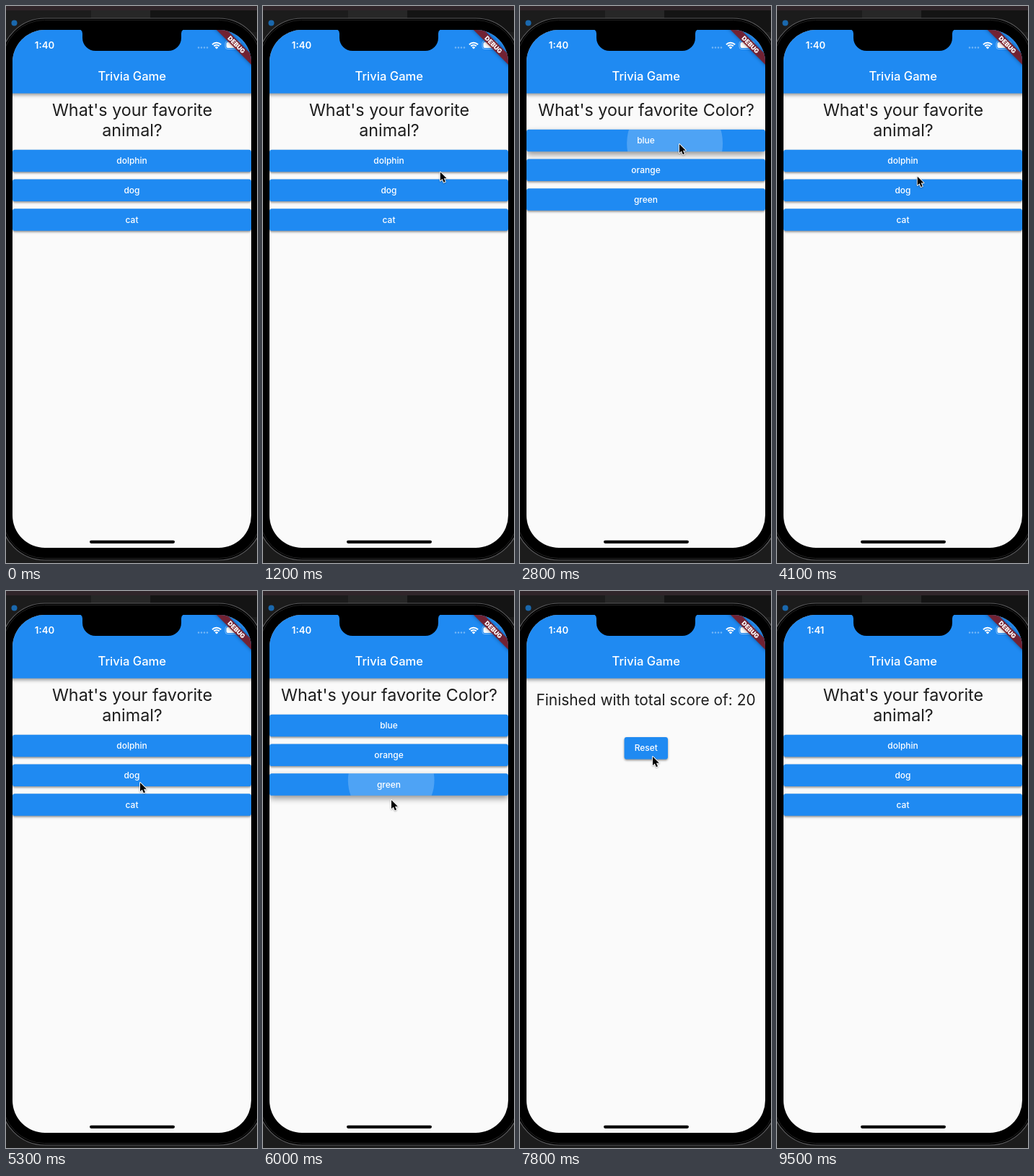
Animation of 348 by 770 pixels, one loop 9900 ms. Source, as an HTML page with a canvas:

```html
<!DOCTYPE html>
<html lang="en">
<head>
<meta charset="utf-8">
<title>Trivia Game</title>
<style>
html, body { margin: 0; width: 100%; height: 100%; overflow: hidden; background: #171717; }
canvas { display: block; width: 348px; height: 770px; }
</style>
</head>
<body>
<canvas id="stage"></canvas>
<script>
const W = 348, H = 770, LOOP = 9900, STEP = 100;
const BLUE = '#1f8af2', INK = '#1d1d1d';
const FONT = 'Inter, Roboto, sans-serif';
const SCREEN = { x: 9, y: 33, w: 331, h: 716, r: 45 };

const canvas = document.getElementById('stage');
const ratio = window.devicePixelRatio || 1;
canvas.width = W * ratio;
canvas.height = H * ratio;
const ctx = canvas.getContext('2d');

const PAGES = {
  animal: { lines: ["What's your favorite", 'animal?'], options: ['dolphin', 'dog', 'cat'], top: 198.7 },
  color: { lines: ["What's your favorite Color?"], options: ['blue', 'orange', 'green'], top: 170.7 }
};
const SCHEDULE = [
  [0, 'animal'], [1900, 'color'], [2900, 'result'], [3700, 'animal'],
  [6000, 'color'], [7000, 'result'], [8000, 'animal']
];

// y is relative to the top of the pressed button
const PRESSES = [
  { down: 1790, up: 1900, button: 0, x: 242, y: 24, quiz: true },
  { down: 2650, up: 2900, button: 0, x: 221, y: 20, quiz: true },
  { down: 3590, up: 3700, button: 0, x: 202, y: 12, quiz: false },
  { down: 5890, up: 6000, button: 2, x: 178, y: 9, quiz: true },
  { down: 6890, up: 7000, button: 2, x: 192, y: 17, quiz: true },
  { down: 7890, up: 8000, button: 0, x: 184, y: 27, quiz: false }
];

// time, x, y of the pointer tip
const POINTER = [
  [400, 324, 330], [1300, 243, 226], [1400, 242, 222], [1900, 242, 222],
  [2700, 221, 191], [3100, 221, 191], [3300, 202, 214], [3700, 202, 214],
  [4400, 190, 250], [4900, 182, 275], [5300, 186, 265], [5400, 186, 265],
  [5600, 178, 289], [6000, 178, 289], [6400, 192, 269], [7000, 192, 269],
  [7800, 184, 229], [8000, 184, 229], [8800, 181, 275], [8900, 181, 172]
];
const POINTER_END = 9000;

const clamp = v => Math.max(0, Math.min(1, v));
const mix = (a, b, k) => a + (b - a) * k;

// cubic-bezier(.25, .1, .25, 1)
function ease(x) {
  let lo = 0, hi = 1;
  for (let i = 0; i < 24; i++) {
    const s = (lo + hi) / 2, u = 1 - s;
    if (0.75 * u * u * s + 0.75 * u * s * s + s * s * s < x) lo = s; else hi = s;
  }
  const u = 1 - lo;
  return 0.3 * u * u * lo + 3 * u * lo * lo + lo * lo * lo;
}

function roundRect(x, y, w, h, r) {
  ctx.beginPath();
  ctx.roundRect(x, y, w, h, r);
}

function text(str, x, y, size, weight, color) {
  ctx.font = `${weight} ${size}px ${FONT}`;
  ctx.fillStyle = color;
  ctx.textAlign = 'center';
  ctx.fillText(str, x, y);
}

function shadow(alpha, blur, dy) {
  ctx.shadowColor = `rgba(0,0,0,${alpha})`;
  ctx.shadowBlur = blur * ratio;
  ctx.shadowOffsetY = dy * ratio;
}

function drawDesktop() {
  ctx.fillStyle = '#1c1c1c';
  ctx.fillRect(0, 0, W, H);
  ctx.fillStyle = '#272727';
  ctx.fillRect(118, 6, 82, 12);
  ctx.fillStyle = '#141414';
  ctx.fillRect(200, 6, 148, 30);
  ctx.fillStyle = '#30252a';
  ctx.fillRect(0, 0, W, 6);
  ctx.fillStyle = '#1a68ad';
  ctx.beginPath();
  ctx.arc(11.5, 23.5, 4, 0, 7);
  ctx.fill();
}

function drawBody() {
  roundRect(-7, 17, 363, 749, 61);
  ctx.fillStyle = '#000';
  ctx.fill();
  ctx.lineWidth = 1.2;
  ctx.strokeStyle = '#5a5a5c';
  ctx.stroke();
  roundRect(-4.5, 19.5, 358, 744, 58);
  ctx.lineWidth = 1;
  ctx.strokeStyle = '#222';
  ctx.stroke();
}

function drawNotch() {
  const l = 106, r = 243, t = 33, b = 62;
  ctx.beginPath();
  ctx.moveTo(l - 5, t - 1);
  ctx.quadraticCurveTo(l, t, l, t + 5);
  ctx.lineTo(l, b - 18);
  ctx.arcTo(l, b, l + 18, b, 18);
  ctx.lineTo(r - 18, b);
  ctx.arcTo(r, b, r, b - 18, 18);
  ctx.lineTo(r, t + 5);
  ctx.quadraticCurveTo(r, t, r + 5, t - 1);
  ctx.closePath();
  ctx.fillStyle = '#000';
  ctx.fill();
}

function drawStatus(t) {
  text(t < 9500 ? '1:40' : '1:41', 53.5, 59, 13.2, 600, '#fff');
  ctx.fillStyle = 'rgba(255,255,255,.38)';
  for (let i = 0; i < 4; i++) {
    ctx.beginPath();
    ctx.arc(267 + i * 4, 57.5, 1.2, 0, 7);
    ctx.fill();
  }
  ctx.strokeStyle = ctx.fillStyle = '#fff';
  ctx.lineWidth = 2;
  for (const r of [8.3, 5.1]) {
    ctx.beginPath();
    ctx.arc(292, 59, r, -Math.PI * 0.76, -Math.PI * 0.24);
    ctx.stroke();
  }
  ctx.beginPath();
  ctx.moveTo(292, 59.5);
  ctx.arc(292, 59.5, 3.2, -Math.PI * 0.76, -Math.PI * 0.24);
  ctx.fill();
  roundRect(305.5, 50, 18, 8, 2);
  ctx.fill();
  roundRect(304, 48.5, 21, 11, 3.2);
  ctx.lineWidth = 0.9;
  ctx.strokeStyle = 'rgba(255,255,255,.45)';
  ctx.stroke();
}

function drawBanner() {
  ctx.save();
  ctx.translate(340, 33);
  ctx.rotate(Math.PI / 4);
  shadow(0.5, 5, 0);
  ctx.fillStyle = 'rgba(128,26,36,.86)';
  ctx.fillRect(-50, 23.8, 100, 10.2);
  shadow(0, 0, 0);
  text('DEBUG', 0, 32, 8.6, 900, '#fff');
  ctx.restore();
}

function pressFor(t, i, quiz) {
  return PRESSES.find(p =>
    p.button === i && p.quiz === quiz && t >= p.down && t < p.up + 400);
}

function drawRipple(p, t, x, y, w, h) {
  const held = Math.min(t, p.up) - p.down;
  const k = ease(clamp(held / 1200 + Math.max(0, t - p.up) / 225));
  const full = Math.hypot(w, h) / 2;
  const alpha = clamp((t - p.down) / 75) * (1 - clamp((t - p.up - 225) / 150));
  ctx.save();
  ctx.clip();
  ctx.fillStyle = `rgba(255,255,255,${0.21 * alpha})`;
  ctx.beginPath();
  ctx.arc(mix(p.x, x + w / 2, k), mix(y + p.y, y + h / 2, k), mix(full * 0.3, full + 5, k), 0, 7);
  ctx.fill();
  ctx.restore();
}

function drawButton(label, x, y, w, i, quiz, t) {
  const h = 30.6, p = pressFor(t, i, quiz);
  const lift = p ? clamp((t - p.down) / 110) * (1 - clamp((t - p.up) / 200)) : 0;
  roundRect(x, y, w, h, 3.4);
  ctx.fillStyle = BLUE;
  shadow(0.42, mix(3, 9, lift), mix(1.6, 4, lift));
  ctx.fill();
  shadow(0, 0, 0);
  if (p) drawRipple(p, t, x, y, w, h);
  text(label, x + w / 2, y + 19.4, 12, 500, '#fff');
}

function drawPage(name, t) {
  if (name === 'result') {
    text('Finished with total score of: 20', 174.5, 158, 20.9, 400, INK);
    drawButton('Reset', 144.6, 202, 60.4, 0, false, t);
    return;
  }
  const page = PAGES[name];
  page.lines.forEach((s, i) => text(s, 175, 152 + i * 28, 23.3, 400, INK));
  page.options.forEach((s, i) =>
    drawButton(s, SCREEN.x, page.top + i * 40.75, SCREEN.w, i, true, t));
}

function drawScreen(t) {
  const { x, y, w, h, r } = SCREEN;
  ctx.save();
  roundRect(x, y, w, h, r);
  ctx.clip();
  ctx.fillStyle = '#fafafa';
  ctx.fillRect(x, y, w, h);
  drawPage(SCHEDULE.filter(s => s[0] <= t).pop()[1], t);
  shadow(0.42, 5, 2);
  ctx.fillStyle = BLUE;
  ctx.fillRect(x - 8, y - 8, w + 16, 95.7);
  shadow(0, 0, 0);
  text('Trivia Game', 174.8, 103, 16.6, 500, '#fff');
  drawStatus(t);
  drawBanner();
  drawNotch();
  roundRect(116, 738.7, 118, 4.2, 2.1);
  ctx.fillStyle = '#000';
  ctx.fill();
  ctx.restore();
}

function pointerAt(t) {
  const i = POINTER.findIndex(p => p[0] > t);
  if (i < 0) return POINTER[POINTER.length - 1].slice(1);
  const [t0, x0, y0] = POINTER[i - 1], [t1, x1, y1] = POINTER[i];
  const s = (t - t0) / (t1 - t0), k = s * s * (3 - 2 * s);
  return [mix(x0, x1, k), mix(y0, y1, k)];
}

function drawPointer(t) {
  if (t < POINTER[0][0] || t >= POINTER_END) return;
  const [x, y] = pointerAt(t);
  ctx.save();
  ctx.translate(x, y);
  ctx.beginPath();
  ctx.moveTo(0, 0);
  for (const [px, py] of [[0, 12], [2.8, 9.5], [4.9, 14.2], [7, 13.3], [5, 8.7], [8.8, 8.7]]) ctx.lineTo(px, py);
  ctx.closePath();
  ctx.lineJoin = 'round';
  ctx.lineWidth = 1.8;
  ctx.strokeStyle = '#fff';
  shadow(0.35, 2, 0.8);
  ctx.stroke();
  shadow(0, 0, 0);
  ctx.fillStyle = '#000';
  ctx.fill();
  ctx.restore();
}

function render(now) {
  const t = Math.floor((now % LOOP) / STEP) * STEP;
  ctx.setTransform(ratio, 0, 0, ratio, 0, 0);
  drawDesktop();
  drawBody();
  drawScreen(t);
  drawPointer(t);
}

const start = performance.now();
function tick() {
  render(performance.now() - start);
  requestAnimationFrame(tick);
}
tick();
</script>
</body>
</html>
```
